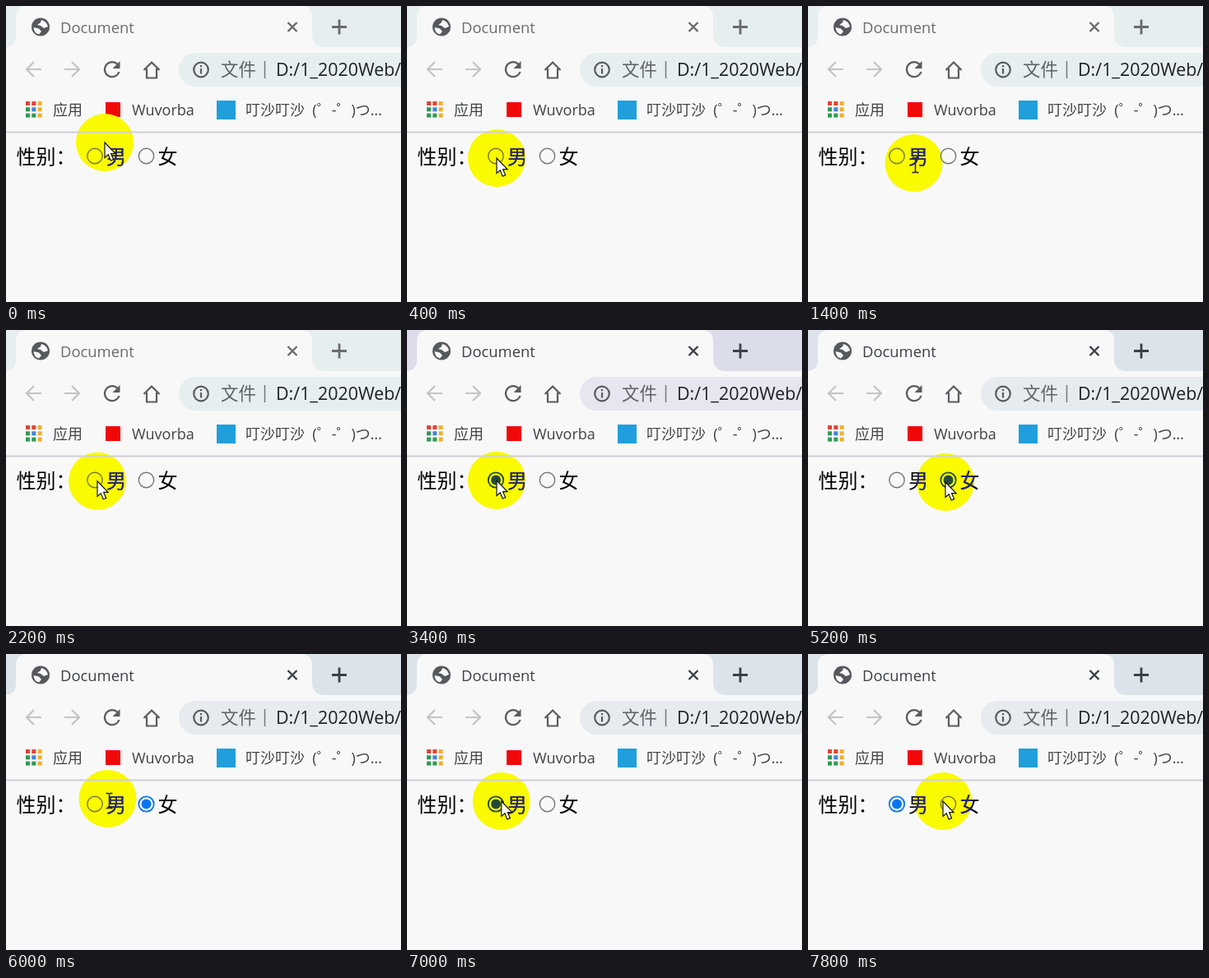
Write an HTML page that moves like this. It is 480 px wide and 360 px high and loops after 8000 ms.

```html
<!DOCTYPE html>
<html lang="zh">
<head>
<meta charset="utf-8">
<title>Document</title>
<style>
  html, body { margin: 0; width: 100%; height: 100%; overflow: hidden; background: #f8f8f8; }
  svg { display: block; width: 480px; height: 360px; --ink: #6a6b6d; }
  svg.active { --ink: #3a4048; }
  text { font-family: "Open Sans", "Noto Sans CJK SC", "Noto Sans CJK", sans-serif; font-size: 18px; white-space: pre; }
  .strip { fill: var(--strip); }
  .pill { fill: var(--pill); }
  .ink { stroke: var(--ink); fill: none; }
  .title { fill: var(--ink); font-size: 18.4px; }
  .icon { fill: none; stroke: #5a5c60; stroke-width: 2.2; }
  .off { fill: none; stroke: #c3c4c6; stroke-width: 2.2; }
  .mark { fill: #404246; }
  .url { font-size: 21.4px; }
  .page text { font-size: 24px; font-weight: 300; }
  .radio { fill: none; stroke: #767676; stroke-width: 1.4; --dot: #0875f0; }
  .radio.lit { stroke: #77773c; --dot: #24493c; }
  .radio.on { stroke: var(--dot); stroke-width: 1.8; }
  .radio.on .dot { fill: var(--dot); }
  .dot { stroke: none; }
</style>
</head>
<body>
<svg viewBox="0 0 480 360">
  <defs>
    <clipPath id="spot"><circle class="spot" r="35"/></clipPath>
  </defs>
  <rect width="480" height="360" fill="#f8f8f8"/>

  <!-- tab strip -->
  <rect class="strip" width="480" height="50"/>
  <path fill="#f8f8f8" d="M0 50Q12 49 12 36V14Q12 0 26 0H358Q372 0 372 14V36Q373 49 386 50Z"/>
  <circle cx="42" cy="25.500" r="11" fill="#55585c"/>
  <path fill="#f8f8f8" d="M43 17Q49 18 51 25L46 27 42 24 38 23 42 20ZM33.500 26L40 27.500 43 31 40 34.500Q34 33 33.500 26Z"/>
  <text class="title" x="66" y="32.500">Document</text>
  <path class="ink" stroke-width="2.400" d="M342.500 20l11 11m0-11l-11 11"/>
  <path class="ink" stroke-width="2.800" d="M396 25.500h18m-9-9v18"/>

  <!-- toolbar -->
  <path class="off" d="M43 77H25m9-9l-9 9 9 9M71 77h18m-9-9l9 9-9 9"/>
  <path class="icon" d="M136 71.500A9 9 0 1 0 137.500 80"/>
  <path fill="#5a5c60" d="M138.500 67v9h-9z"/>
  <path class="icon" d="M167.500 78L177 68.500l9.500 9.500M171 76v11.500h12V76"/>
  <rect class="pill" x="210" y="57" width="300" height="41" rx="20.500"/>
  <circle class="icon" cx="237" cy="77.500" r="8.800"/>
  <path class="icon" d="M237 76v6.500M237 72v2.300"/>
  <text class="url" x="261" y="85" fill="#5f6368">文件</text>
  <path stroke="#75787c" stroke-width="1.500" d="M314.500 67v21"/>
  <text class="url" x="328" y="85" fill="#1f2023">D:/1_2020Web/</text>

  <!-- bookmarks -->
  <g id="apps"></g>
  <text class="mark" x="57" y="133">应用</text>
  <rect x="121" y="117" width="18" height="18" fill="#f00808"/>
  <text class="mark" x="153" y="133">Wuvorba</text>
  <rect x="256" y="115" width="23" height="23" fill="#1f9fdc"/>
  <text class="mark" x="291" y="133">叮沙叮沙  (゜-゜)つ…</text>

  <!-- page -->
  <circle class="spot" r="35" fill="#fafa00"/>
  <path stroke="#cfd0d6" stroke-width="2" d="M0 153.500h480"/>
  <g class="page">
    <g id="labels">
      <text x="12.500" y="192">性别：</text>
      <text x="122" y="192">男</text>
      <text x="184.500" y="192">女</text>
    </g>
    <use href="#labels" fill="#26267c" clip-path="url(#spot)"/>
  </g>
  <g id="radios"></g>

  <path id="arrow" fill="#fff" stroke="#111" stroke-width="1.200" d="M0 0V18.500L4.200 14.800 7.200 22 10.600 20.600 7.600 13.600H13Z"/>
  <path id="beam" fill="none" stroke="#222" stroke-width="1.500" d="M-4-9h3l1 1 1-1h3M0-8V8M-4 9h3l1-1 1 1h3"/>
</svg>
<script>
const $ = s => document.querySelector(s);
const svg = $('svg'), arrow = $('#arrow'), beam = $('#beam');
const spots = document.querySelectorAll('.spot');
const LOOP = 8000, STEP = 200;
const RADIO_X = [108, 170.5], RADIO_Y = 182.5;

// pointer moves: each eases from the previous end point
const home = { x: 120, y: 166 };
const moves = [
  { from: 0, to: 400, x: 109, y: 185 },
  { from: 1000, to: 1400, x: 128.5, y: 191 },
  { from: 1400, to: 2400, x: 109, y: 183 },
  { from: 3800, to: 4400, x: 183, y: 185 },
  { from: 4400, to: 5000, x: 167, y: 185 },
  { from: 5400, to: 6000, x: 123.5, y: 176 },
  { from: 6000, to: 6400, x: 109, y: 179 },
  { from: 6800, to: 7800, x: 164, y: 179 }
];
const clicks = [3400, 5200, 6800];

const clamp = v => Math.min(1, Math.max(0, v));
const ease = p => p * p * (3 - 2 * p);

function pointer(t) {
  return moves.reduce((p, m) => {
    const k = ease(clamp((t - m.from) / (m.to - m.from)));
    return { x: p.x + (m.x - p.x) * k, y: p.y + (m.y - p.y) * k };
  }, home);
}

const colors = ['#e04438', '#eeb030', '#2d9c50', '#4285d8'];
$('#apps').innerHTML = [...'001231221'].map((c, i) =>
  `<rect x="${24 + i % 3 * 7.3}" y="${116 + Math.floor(i / 3) * 7.3}" width="5" height="5" fill="${colors[c]}"/>`).join('');

$('#radios').innerHTML = RADIO_X.map(x =>
  `<g class="radio" transform="translate(${x} ${RADIO_Y})"><circle r="9.2"/><circle class="dot" r="6"/></g>`).join('');
const radios = document.querySelectorAll('.radio');

function draw(t) {
  const { x, y } = pointer(t);
  spots.forEach(c => { c.setAttribute('cx', x); c.setAttribute('cy', y); });

  const onText = x > 121.5 && x < 147;
  arrow.style.display = onText ? 'none' : '';
  beam.style.display = onText ? '' : 'none';
  arrow.setAttribute('transform', `translate(${x} ${y})`);
  beam.setAttribute('transform', `translate(${x + 2} ${y + 2.5})`);

  // clicks alternate between the two choices; the first one focuses the window
  const count = clicks.filter(c => c <= t).length;
  radios.forEach((r, i) => {
    r.classList.toggle('on', count > 0 && (count - 1) % 2 === i);
    r.classList.toggle('lit', Math.hypot(RADIO_X[i] - x, RADIO_Y - y) < 35);
  });

  const active = count > 0;
  const hue = !active ? 188 : t < 4000 ? 236 : t < 5000 ? 40 : 210;
  svg.classList.toggle('active', active);
  svg.style.setProperty('--strip', `hsl(${hue} 25% ${active ? 89 : 92}%)`);
  svg.style.setProperty('--pill', `hsl(${hue} 25% 92%)`);
}

const start = performance.now();
function tick() {
  const t = (performance.now() - start) % LOOP;
  draw(Math.floor(t / STEP) * STEP);
  requestAnimationFrame(tick);
}
tick();
</script>
</body>
</html>
```
